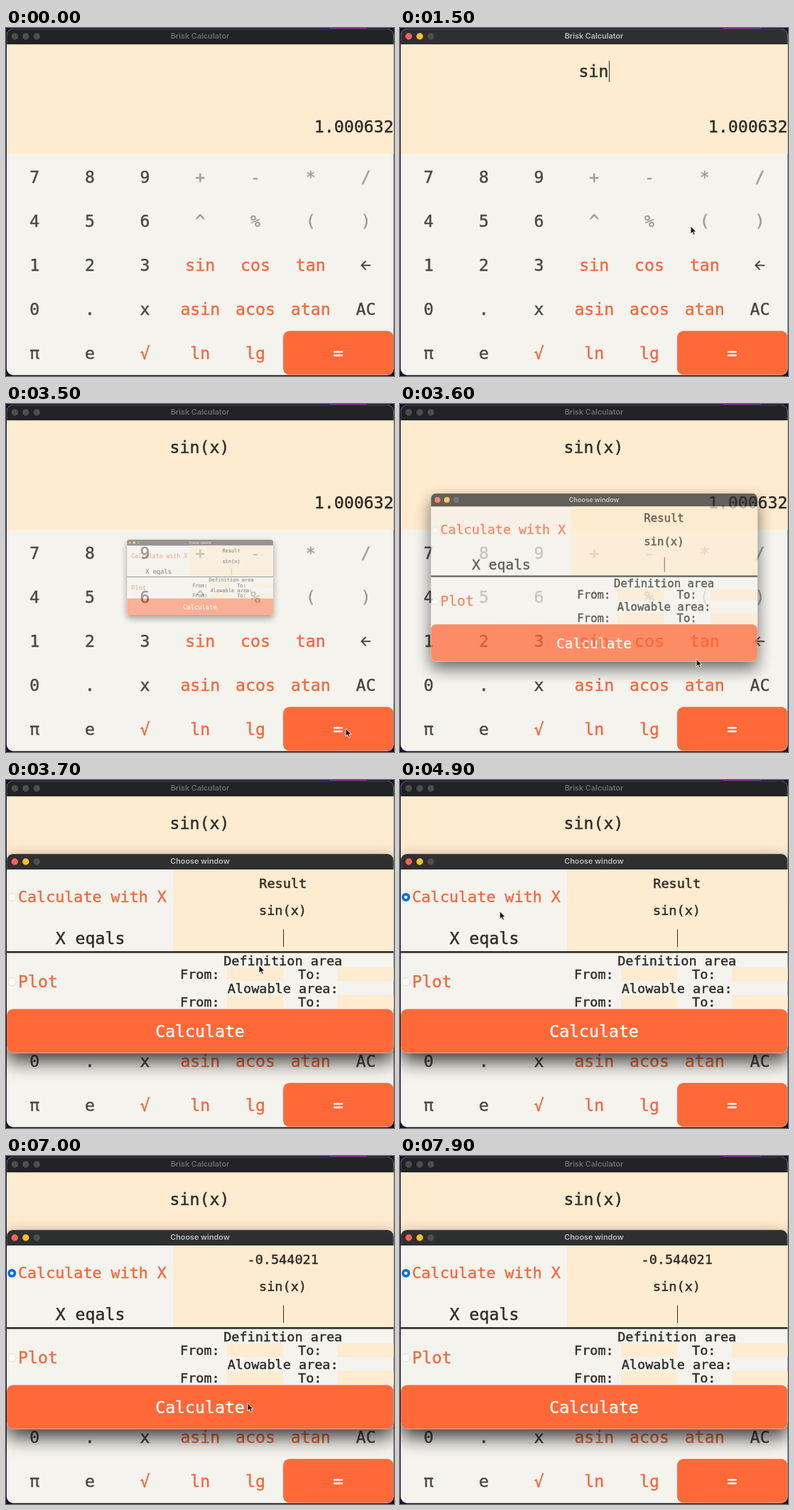
Recreate the animation shown at these times as an HTML page. Size 546x490 px, loop 8 s.

```html
<!DOCTYPE html>
<html lang="en">
<head>
<meta charset="utf-8">
<title>Calculator</title>
<style>
  html, body { margin: 0; width: 100%; height: 100%; overflow: hidden; background: #160f2b; }
  svg { display: block; width: 546px; height: 490px; }
  text { font-family: "DejaVu Sans Mono", "Noto Sans Mono", monospace; font-size: 23.2px; white-space: pre; stroke-width: .45px; }
  text.s { font-size: 18.5px; }
  text.title { font: 600 10.8px Inter, "Liberation Sans", sans-serif; stroke-width: 0; }
  .mid { text-anchor: middle; }
  .end { text-anchor: end; }
  .rim { fill: none; stroke: #fff; stroke-opacity: .16; }
  #shade { filter: drop-shadow(0 12px 13px rgba(0, 0, 0, .75)); }
</style>
</head>
<body>
<svg id="stage" viewBox="0 0 546 490"></svg>
<script>
const INK = '#2f2b28', DIGIT = '#4a4846', GREY = '#9d9b98', ORANGE = '#f06b3f',
      BUTTON = '#ff6938', CREAM = '#ffebcf', PAPER = '#f5f3ee';
const $ = id => document.getElementById(id);

const rect = (x, y, w, h, fill, r = 0) =>
  `<rect x="${x}" y="${y}" width="${w}" height="${h}" rx="${r}" fill="${fill}"/>`;
const text = (s, x, y, fill = INK, cls = '', more = '') =>
  `<text x="${x}" y="${y}" fill="${fill}" stroke="${fill}" class="${cls}" ${more}>${s}</text>`;
const dot = (x, y, fill, id) =>
  `<circle cx="${x}" cy="${y}" r="4.7" fill="${fill}"${id ? ` id="${id}"` : ''}/>`;
const rim = (y, h) => `<rect class="rim" x="1.5" y="${y + .5}" width="543.5" height="${h - 1}" rx="8.5"/>`;
const radio = y => `<circle cx="8.3" cy="${y}" r="5.6" fill="#faf9f6" stroke="#dad8d4" stroke-width=".8"/>`;
const caret = (id, y, h) => `<rect id="${id}" y="${y}" width="1" height="${h}" fill="${INK}"/>`;

// Key pad; the empty slot holds the drawn back arrow
const rows = ['7 8 9 + - * /', '4 5 6 ^ % ( )', '1 2 3 sin cos tan', '0 . x asin acos atan AC', 'π e √ ln lg'];
const keyColor = k => /^[-+*/^%()]$/.test(k) ? GREY : /^(√|ln|lg|a?(sin|cos|tan))$/.test(k) ? ORANGE : DIGIT;
const keys = rows.map((row, r) => row.split(' ').map((k, c) =>
  text(k, 40.2 + 77.7 * c, 217.5 + 62.2 * r, keyColor(k), 'mid')).join('')).join('');
const backArrow = `<path d="M513 334.2H501M506.5 328 500.3 334.2 506.5 340.4" fill="none" stroke="${DIGIT}" stroke-width="2"/>`;

const calculator = `<g clip-path="url(#frame)">
  ${rect(1, 1, 545, 488, PAPER)}
  <rect id="bar" x="1" y="1" width="545" height="22"/>
  ${dot(12.3, 11.8, '', 'red')}${dot(27.8, 11.8, '', 'amber')}${dot(43.3, 11.8, '#4c4d4f')}
  ${text('Brisk Calculator', 273, 15.3, '', 'title mid', 'id="name"')}
  ${rect(1, 23, 545, 154, CREAM)}
  ${text('', 272.5, 69, INK, 'mid', 'id="formula"')}${caret('caret', 46, 30)}
  ${text('1.000632', 545.5, 147, INK, 'end')}
  ${keys}${backArrow}
  ${rect(390, 426.5, 155.5, 62, BUTTON, 9)}${text('=', 467.5, 466.3, '#fff', 'mid')}
  ${rim(1, 487.7)}
</g>`;

const fields = [264, 303].map(y =>
  rect(311, y, 79, 19, CREAM) + rect(467, y, 79, 19, CREAM) +
  text('From:', 245, y + 16, INK, 's') + text('To:', 411, y + 16, INK, 's')).join('');

const chooser = `<g id="popup"><g id="shade"><g clip-path="url(#popFrame)">
  ${rect(1, 104, 545, 281, PAPER)}${rect(1, 104, 545, 22, '#2e2f31')}
  ${dot(12.3, 115, '#fe5f57')}${dot(27.8, 115, '#febc2e')}${dot(43.3, 115, '#4c4d4f')}
  ${text('Choose window', 273, 118.4, '#bcbcbd', 'title mid')}
  ${rect(235, 126, 311, 115.5, CREAM)}${rect(1, 241, 545, 2.6, '#2c3026')}
  ${radio(165)}${radio(284)}
  <g id="picked"><circle cx="8.3" cy="165" r="6" fill="#0a6fe0"/><circle cx="8.3" cy="165" r="2.3" fill="#fff"/></g>
  ${text('Calculate with X', 17, 172, ORANGE, '', 'style="font-size:21.7px"')}
  ${text('X eqals', 118.5, 231, INK, 'mid')}${text('Plot', 17, 291.5, ORANGE)}
  ${text('', 389.7, 151.6, INK, 's mid', 'id="result"')}${text('sin(x)', 389.5, 190.3, INK, 's mid')}
  ${text('', 389.5, 229.5, INK, 's mid', 'id="value"')}${caret('popCaret', 210.5, 24.5)}
  ${text('Definition area', 389.7, 260.7, INK, 's mid')}${text('Alowable area:', 389.7, 299.7, INK, 's mid')}
  ${fields}
  ${rect(1, 322.5, 544.5, 62, BUTTON, 9)}${text('Calculate', 273, 362, '#fff', 'mid')}
  ${rim(104, 280.5)}
</g></g></g>`;

$('stage').innerHTML = `<defs>
  <clipPath id="frame">${rect(1, 1, 544.5, 487.7, '', 9)}</clipPath>
  <clipPath id="popFrame">${rect(1, 104, 544.5, 280.5, '', 9)}</clipPath></defs>
  ${rect(0, 0, 546, 490, '#160f2b')}${rect(455, 0, 53, 1, '#6a2080')}
  ${calculator}${chooser}
  <path id="pointer" d="M0 0V11L2.6 8.6 4.3 12.5 6.3 11.6 4.6 7.9H8Z" fill="#111" stroke="#fff" stroke-width=".9" stroke-linejoin="round"/>`;

// Pointer stops: time, x, y
const trips = [
  [[100, 122, 209], [400, 405, 446], [900, 275, 333], [1200, 275, 333], [1500, 409, 279], [1800, 428, 275],
   [1900, 428, 275], [2200, 192, 392], [2400, 192, 392], [2700, 479, 283], [2800, 506, 272], [3000, 506, 272],
   [3300, 478, 457], [3500, 478, 457], [3700, 356, 261], [4400, 9, 163], [4700, 9, 163], [5200, 382, 225], [5500, 382, 225]],
  [[6700, 382, 225], [6900, 340, 348], [7100, 340, 348], [7500, 470, 230], [7800, 474, 222]]
];
const formula = [[0, ''], [1100, 'sin'], [1900, 'sin('], [2300, 'sin(x'], [2900, 'sin(x)']];
const value = [[3500, ''], [5500, '1'], [5900, '10'], [6900, '']];

const latest = (list, t) => list.filter(e => e[0] <= t).pop() || list[0];
const show = (id, on) => $(id).setAttribute('visibility', on ? 'visible' : 'hidden');

function pointerAt(t) {
  const trip = trips.find(p => t >= p[0][0] && t < p[p.length - 1][0]);
  if (!trip) return null;
  const i = trip.findIndex(p => p[0] > t), [t0, x0, y0] = trip[i - 1], [t1, x1, y1] = trip[i];
  const u = (t - t0) / (t1 - t0), e = u * u * (3 - 2 * u);
  return [x0 + (x1 - x0) * e, y0 + (y1 - y0) * e];
}

function type(id, caretId, list, t, size, mid, live) {
  const [since, s] = latest(list, t);
  $(id).textContent = s;
  $(caretId).setAttribute('x', Math.round(mid + s.length * size * .301));
  show(caretId, live && (t - since) % 1000 < 500);
}

function draw(t) {
  const active = t >= 1000 && t < 3400, open = t >= 3500;
  $('bar').setAttribute('fill', active ? '#2e2f31' : '#222325');
  $('name').setAttribute('fill', active ? '#bcbcbd' : '#6b6b6c');
  $('red').setAttribute('fill', active ? '#fe5f57' : '#4c4d4f');
  $('amber').setAttribute('fill', active ? '#febc2e' : '#4c4d4f');
  type('formula', 'caret', formula, t, 23.2, 273, active);

  $('popup').setAttribute('display', open ? 'inline' : 'none');
  const grow = Math.min(1, (t - 3500) / 200), k = 1 - .622 * (1 - grow) ** 2;
  $('popup').setAttribute('transform', `translate(273 244) scale(${k}) translate(-273 -244)`);
  $('popup').setAttribute('opacity', .48 + .52 * grow);
  show('picked', t >= 4600);
  $('result').textContent = t >= 6900 ? '-0.544021' : 'Result';
  type('value', 'popCaret', value, t, 18.5, 389.5, open);

  const p = pointerAt(t);
  show('pointer', p);
  if (p) $('pointer').setAttribute('transform', `translate(${p})`);
}

function tick() {
  draw(Math.floor(performance.now() % 8000 / 100) * 100);
  requestAnimationFrame(tick);
}
tick();
</script>
</body>
</html>
```
